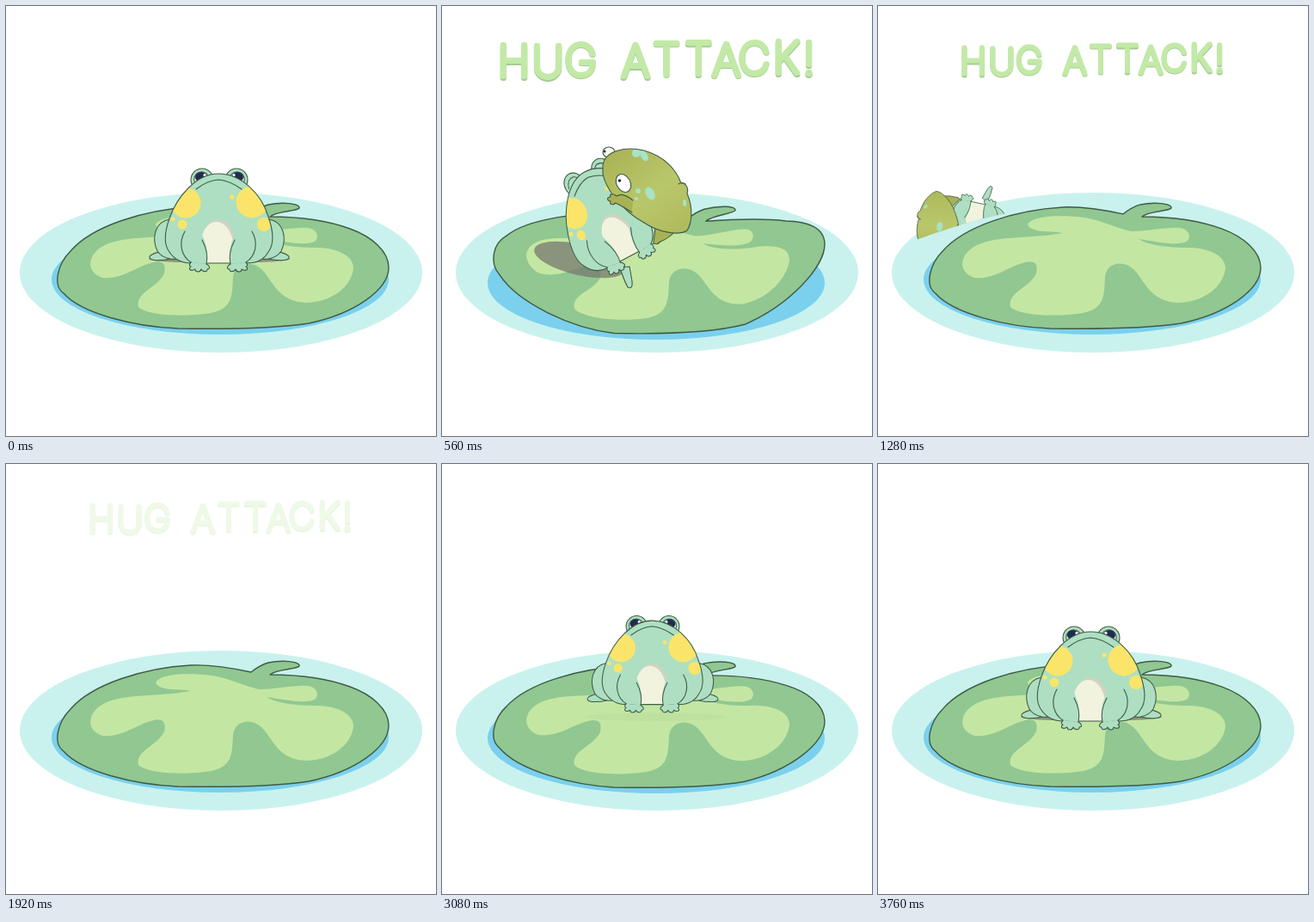
An HTML page for the animation above (3800 ms loop, 500 px wide and 500 px high).

```html
<!DOCTYPE html>
<html lang="en">
<head>
<meta charset="utf-8">
<title>Hug attack</title>
<style>
html, body { margin: 0; width: 100%; height: 100%; overflow: hidden; background: #fff; }
svg { display: block; width: 100vw; height: 100vh; }
.line { stroke: #3f5b45; stroke-width: 1.1; stroke-linecap: round; stroke-linejoin: round; }
.skin { fill: #aedfc2; }
.olive { fill: #a9b253; }
.yellow { fill: #fae56a; }
.mint { fill: #a8e3c6; }
.none { fill: none; }
text {
  font: 100 42px Inter, Roboto, sans-serif; text-anchor: middle;
  stroke-width: 5; stroke-linejoin: round; stroke-linecap: round;
}
</style>
</head>
<body>
<svg viewBox="0 0 500 500">
  <defs>
    <linearGradient id="moss" x1="0" y1="0" x2=".8" y2="1">
      <stop offset="0" stop-color="#a9b154"/>
      <stop offset=".6" stop-color="#b9c76b"/>
      <stop offset="1" stop-color="#b0bb5d"/>
    </linearGradient>
    <clipPath id="above"><path d="M0 0H500V234H215C150 236 100 252 53 269L0 286Z"/></clipPath>
    <clipPath id="pond"><ellipse cx="250" cy="310" rx="234" ry="93"/></clipPath>
    <path id="torso" d="M247 195C222 195 199 221 190 247C184 264 183 277 190 286C196 295 205 299 216 299H280C291 299 300 295 305 286C312 277 311 262 305 245C297 218 273 195 247 195Z"/>
    <clipPath id="inTorso"><use href="#torso"/></clipPath>
    <path id="bean" d="M187 185C190 168 213 163 235 168C260 175 273 192 278 206C284 206 287 212 285 218C292 234 291 252 285 261C274 268 250 262 235 252C211 239 190 213 187 195Z"/>
    <clipPath id="inBean"><use href="#bean"/></clipPath>
    <g id="arm">
      <path class="skin" d="M209 258C200 276 204 291 215 298L233 300C235 288 234 278 228 266L221 250Z"/>
      <path class="line skin" d="M215 298C212 301 214 303 215 303C211 306 215 309 220 306C220 310 226 310 227 306C229 310 235 309 234 306C238 306 237 302 233 300"/>
      <path class="line none" d="M208 262C200 276 204 291 215 298M228 272Q236 287 233 300"/>
    </g>
    <g id="hind" class="line skin">
      <path d="M188 288C180 283 166 289 167 293C169 297 182 296 191 294Z"/>
      <path d="M190 248C173 251 169 270 176 285C182 294 195 296 203 293Z"/>
    </g>
    <g id="eye">
      <circle class="line skin" cx="228" cy="202" r="13"/>
      <g class="open">
        <circle class="line" cx="227.500" cy="201.500" r="8.800" fill="#e9f3e6"/>
        <ellipse cx="227" cy="199" rx="7" ry="6" fill="#212c50"/>
        <circle cx="231" cy="196.500" r="1.600" fill="#fff"/>
      </g>
      <path class="shut line none" d="M219 203Q222 193 231 194Q237 196 237 203"/>
    </g>
  </defs>

  <ellipse cx="250" cy="310" rx="234" ry="93" fill="#c9f2ee"/>
  <g clip-path="url(#pond)">
    <ellipse id="ripple" class="none" cx="192" cy="233" stroke="#9bdce6"/>
  </g>
  <ellipse id="under" cx="249" rx="196" fill="#7bd0ed"/>
  <path id="pad" fill="#91c791" stroke="#3f5b45" stroke-width="1.400" stroke-linejoin="round"/>
  <path id="patch" fill="#c3e7a2"/>
  <ellipse id="shade" fill="#77786f"/>

  <g id="actors">
    <g id="pair">
      <path id="heel" class="line skin" d="M207 304Q211 318 216 327Q222 330 221 320L218 303Z"/>
      <g id="frog">
        <g id="legs">
          <use href="#hind"/>
          <use href="#hind" transform="matrix(-1 0 0 1 496 0)"/>
        </g>
        <use href="#eye"/>
        <use href="#eye" transform="matrix(-1 0 0 1 496 0)"/>
        <use href="#torso" class="skin"/>
        <g clip-path="url(#inTorso)">
          <g class="yellow">
            <circle cx="209" cy="229" r="17.500"/>
            <circle cx="205" cy="254" r="5.500"/>
            <circle cx="194" cy="248" r="2.500"/>
            <circle cx="286" cy="228" r="18.500"/>
            <circle cx="263" cy="222" r="2.600"/>
            <circle cx="300" cy="254" r="8"/>
          </g>
          <path fill="#cfd3c2" d="M228 299C223 272 230 249 247 248C264 249 272 272 265 299Z"/>
          <path fill="#f2f3df" d="M228 299C223 274 229 252 244 251C260 251 268 274 265 299Z"/>
        </g>
        <use href="#torso" class="line none"/>
        <path class="line none" d="M221 213Q234 203 247 202Q260 203 274 213"/>
        <use href="#arm"/>
        <use href="#arm" transform="matrix(-1 0 0 1 494 0)"/>
      </g>
      <g id="hugger">
        <path class="line olive" d="M248 258L246 275Q249 279 254 274Q264 270 271 262Z"/>
        <ellipse class="line" cx="194" cy="170" rx="7" ry="6" fill="#f7f8ea"/>
        <circle cx="189" cy="169" r="1.500" fill="#212c50"/>
        <use href="#bean" fill="url(#moss)"/>
        <g class="mint" clip-path="url(#inBean)">
          <ellipse cx="226" cy="171" rx="5" ry="5"/>
          <ellipse cx="235" cy="174" rx="4" ry="7" transform="rotate(-30 235 174)"/>
          <ellipse cx="242" cy="218" rx="5" ry="8" transform="rotate(-30 242 218)"/>
          <circle cx="228" cy="215" r="3"/>
          <circle cx="226" cy="224" r="2"/>
          <ellipse cx="282" cy="229" rx="2" ry="4"/>
        </g>
        <use href="#bean" class="line none"/>
        <path class="line none" d="M275 207Q279 204 283 207"/>
        <ellipse class="line" cx="211" cy="206" rx="8" ry="11" fill="#fff" transform="rotate(-28 211 206)"/>
        <circle cx="206.500" cy="203" r="1.800" fill="#212c50"/>
        <path class="line olive" d="M222 226Q210 216 203 221C198 217 194 219 196 222C191 222 192 227 196 227C194 231 199 232 202 229Q212 234 221 240"/>
      </g>
    </g>
  </g>

  <g id="title"></g>
</svg>
<script>
const LOOP = 3800, STEP = 40;
const HIT = 440, HUG = 560, SUNK = 1440, RISE = 2480, HOP = 2720, LAND = 3100;

const $ = id => document.getElementById(id);
const set = (el, attrs) => { for (const k in attrs) el.setAttribute(k, attrs[k]); };
const show = (el, on) => { el.style.display = on ? '' : 'none'; };
const each = (sel, on) => document.querySelectorAll(sel).forEach(el => show(el, on));
const span = (t, a, b) => Math.min(1, Math.max(0, (t - a) / (b - a)));
const ease = u => u * u * (3 - 2 * u);
const mix = (a, b, u) => a + (b - a) * u;
const place = (x, y, turn, sx, sy, ox, oy) =>
  `translate(${x} ${y}) rotate(${turn}) scale(${sx} ${sy}) translate(${-ox} ${-oy})`;

const leaf = 'M285 242C262 237 238 233 215 234C160 237 100 256 75 285C60 300 54 325 67 334C88 358 150 373 200 375C265 376 320 374 352 369C405 358 445 330 445 304C445 285 425 268 400 259C370 248 335 245 307 245C315 238 338 239 341 235C342 229 320 228 305 231C295 234 290 238 285 242Z';
const blotch = 'M174 254C180 243 215 243 240 246C262 250 270 256 295 262C315 262 335 257 350 258C362 259 364 268 360 273C350 280 325 274 303 271C318 280 345 281 365 281C390 283 404 292 404 305C402 325 380 345 348 345C315 343 310 318 297 306C285 295 266 298 264 315C263 340 262 352 238 357C205 362 165 360 154 350C150 333 176 328 184 311C187 298 180 295 168 299C150 304 135 318 112 316C95 310 95 295 105 285C125 265 170 272 215 264C205 261 178 265 174 254Z';

// Cup the leaf: middle sinks, both ends curl up
const cup = (d, k) => d.replace(/(\d+) (\d+)/g, (_, x, y) =>
  `${x} ${(+y + k * (6 - 33 * Math.abs((x - 250) / 195) ** 3)).toFixed(2)}`);

// Quick push followed by a damped swing
const push = s => s < 160 ? ease(span(s, 0, 160))
  : Math.exp((160 - s) / 160) * Math.cos(Math.PI * (s - 160) / 640);

// Hand-lettered look: each letter sits at its own place on a wavy line
const places = [111, 144, 176, 0, 229, 259, 290, 317, 344, 375, 397];
const lineY = places.map((_, i) => 79 - .35 * i + Math.sin(i * 2));
const lettering = (fill, dy) => `<text fill="${fill}" stroke="${fill}" y="${lineY.map(y => y + dy).join(' ')}"
  x="${places.join(' ')}">HUG ATTACK!</text>`;
$('title').innerHTML = lettering('#a3cd92', 1.5) + lettering('#c3e9a7', 0);

function drawPad(t) {
  const k = push(t - 400) + .35 * push(t - 3000);
  set($('pad'), { d: cup(leaf, k) });
  set($('patch'), { d: cup(blotch, k) });
  set($('under'), { cy: 318 + 4 * k, ry: 64 + 2 * k });
}

function drawFrogs(t) {
  const together = t < SUNK;
  const hug = together ? ease(span(t, HIT, HUG)) : 0;
  const fall = together ? span(t, HUG, SUNK) : 0;

  if (together) {
    set($('frog'), { transform: place(mix(247, 220, hug), mix(303, 295, hug), -28 * hug, 1 - .1 * hug, 1 + .07 * hug, 247, 303) });
    const size = 1 - .39 * fall;
    set($('pair'), { transform: place(195 - 90 * fall * (2 - fall), 245 - 323 * fall + 422 * fall ** 2, -171 * fall, size, size, 195, 245) });
  } else {
    const hop = span(t, HOP, LAND), settle = span(t, LAND, 3380);
    const size = mix(.6, 1, ease(span(t, HOP, 3200)));
    const squash = .08 * Math.sin(2 * Math.PI * settle) * (1 - settle);
    const y = mix(241, 303, hop) - 328 * hop * (1 - hop) + 90 * (1 - ease(span(t, RISE, 2680)));
    set($('frog'), { transform: place(mix(192, 247, hop), y, 0, size * (1 + squash), size * (1 - squash), 247, 303) });
    set($('pair'), { transform: '' });
  }

  const u = span(t, 80, 500), back = 1 - u;
  set($('hugger'), { transform: `translate(${350 * back} ${-70 * back - 340 * u * back}) rotate(${35 * back} 240 215)` });
  show($('hugger'), t >= 80 && together);
  show($('heel'), hug > 0);
  show($('legs'), hug === 0);

  const shut = t >= HIT && t < 2840;
  each('.open', !shut);
  each('.shut', shut);
  show($('actors'), together || t > RISE);
  set($('actors'), { 'clip-path': t > 1040 && t < 2800 ? 'url(#above)' : 'none' });

  const cx = mix(248, 160, hug) - 60 * fall, cy = mix(294, 295, hug);
  set($('shade'), {
    cx, cy, rx: mix(82, 54, hug), ry: mix(5, 18, hug), transform: `rotate(${13 * hug} ${cx} ${cy})`,
    opacity: .75 * (together ? 1 - span(fall, 0, .3) : ease(span(t, 3060, 3180)))
  });
}

function drawRipple(t) {
  const r = span(t, 2520, 2960);
  set($('ripple'), { rx: 45 + 75 * r, ry: 8 + 18 * r, opacity: r > 0 ? .6 * (1 - r) : 0 });
}

function drawTitle(t) {
  const size = ease(span(t, 360, 480)) * (1 + .34 * Math.exp(Math.min(0, 480 - t) / 150));
  set($('title'), { transform: place(249, 62, 0, size, size, 249, 62), opacity: 1 - span(t, 1680, 2000) });
}

const start = performance.now();
function tick() {
  const now = (performance.now() - start) % LOOP;
  const t = Math.floor(now / STEP) * STEP;
  [drawPad, drawFrogs, drawRipple, drawTitle].forEach(part => part(t));
  requestAnimationFrame(tick);
}
tick();
</script>
</body>
</html>
```
